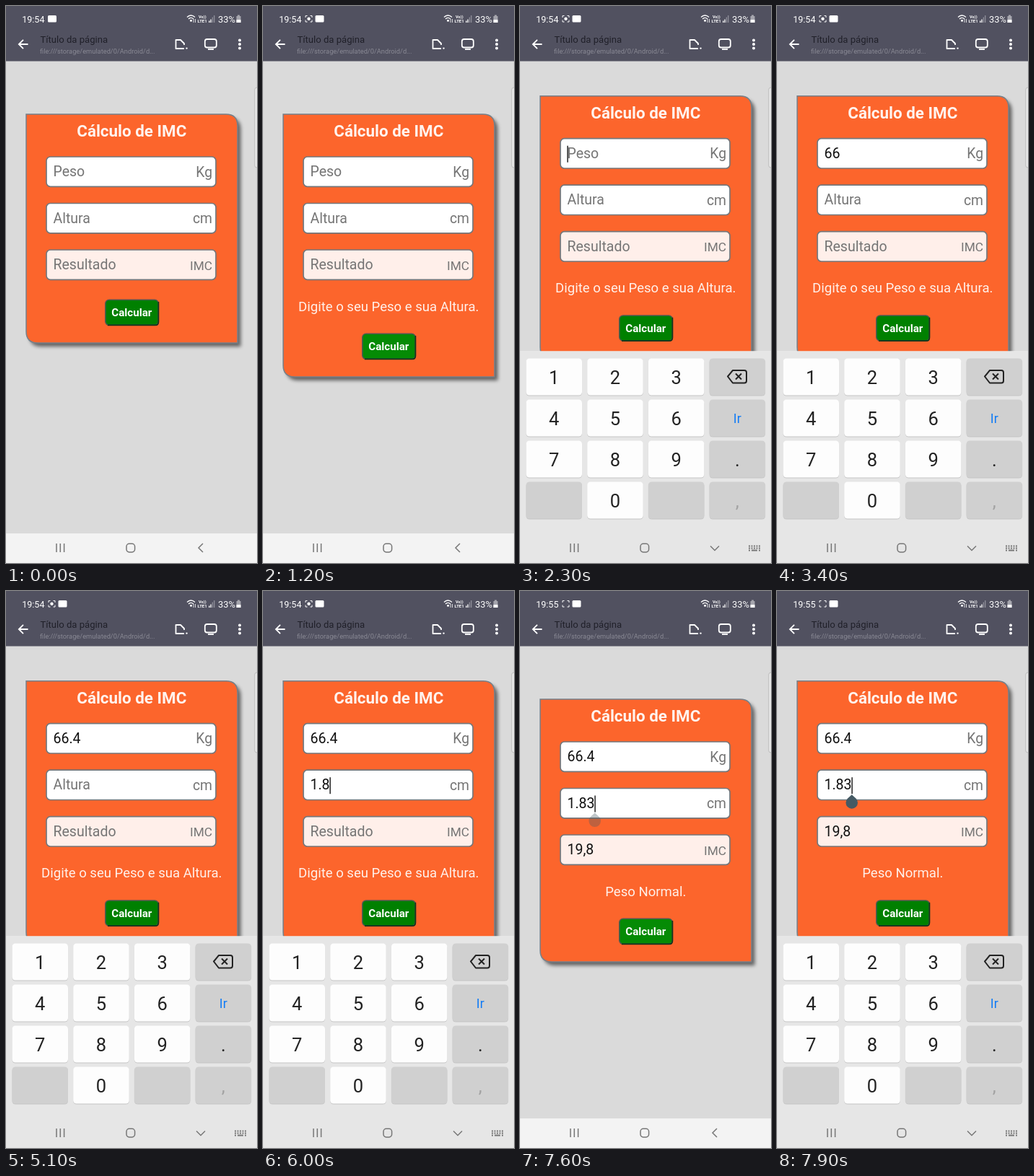
These frames come from a looping animation (348x772 px, 8000 ms). An HTML page:

```html
<!DOCTYPE html>
<html lang="pt">
<head>
<meta charset="utf-8">
<style>
html, body { margin: 0; width: 100%; height: 100%; overflow: hidden; background: #dadada; }
svg { display: block; width: 348px; height: 772px; font-family: Roboto, sans-serif; }
.line { fill: none; stroke: #fff; stroke-width: 1.8; }
.field { stroke: #74777b; stroke-width: 1.7; }
.value { font-size: 19.5px; }
.unit { fill: #757575; text-anchor: end; }
.mid { text-anchor: middle; }
.nav { fill: none; stroke: #777; stroke-width: 1.5; }
.key { font-size: 25.5px; fill: #222; text-anchor: middle; }
</style>
</head>
<body>
<svg viewBox="0 0 348 772">
  <defs>
    <filter id="soft" x="-10%" y="-10%" width="125%" height="125%"><feGaussianBlur stdDeviation="2.6"/></filter>
  </defs>
  <rect width="348" height="772" fill="#dadada"/>

  <g id="page">
    <path id="shadow" fill="#000" opacity=".55" filter="url(#soft)" transform="translate(4.5 5)"/>
    <path id="card" fill="#fc652c" stroke="#75808a" stroke-width="1.5"/>
    <text class="mid" x="174.3" y="181" font-size="22.4" font-weight="700" fill="#fff3ee">Cálculo de IMC</text>
    <g id="fields"></g>
    <text id="message" class="mid" x="174.3" y="422.5" font-size="18.56" fill="#fff0ea"></text>
    <g id="button">
      <rect id="face" x="137.8" y="407.3" width="73.5" height="35" rx="5" stroke="#4d5a50" stroke-width="1.6"/>
      <path d="M141 442.4H207Q211.4 442.4 211.4 438V410" fill="none" stroke="#12331a" stroke-width="1.7"/>
      <text class="mid" x="174.3" y="430" font-size="15.1" font-weight="700" fill="#fff">Calcular</text>
    </g>
    <rect id="caret" width="1.5" height="23" fill="#222"/>
    <path id="handle" d="M0 0L6 5.5A8.3 8.3 0 1 1 -6 5.5Z" fill="#455a64"/>
  </g>

  <rect x="344.8" y="113" width="8" height="111" rx="3" fill="#e8e8e8" stroke="#bbb"/>

  <rect width="348" height="76.5" fill="#515160"/>
  <g fill="#fff">
    <text id="clock" x="22.3" y="22.5" font-size="12.5"></text>
    <g id="capture">
      <path d="M59 16V13.5H61.5M65.5 13.5H68V16M68 19.5V22H65.5M61.5 22H59V19.5" class="line" stroke-width="1" style="stroke-width:1"/>
      <circle id="dot" cx="63.5" cy="17.8" r="2.2"/>
    </g>
    <rect id="badge" y="13" width="12" height="9.5" rx="1.5"/>
    <path d="M251 15.5Q256.500 10.500 262 15.500M253 18Q256.500 14.700 260 18" class="line" style="stroke-width:1.3"/>
    <circle cx="256.5" cy="20.3" r="1.5"/>
    <path d="M260 18V23M262.500 23V18" class="line" style="stroke-width:.8"/>
    <text x="267" y="16.500" font-size="5.600" font-weight="700">Vo))</text>
    <text x="265.500" y="23" font-size="6" font-weight="700">LTE1</text>
    <path d="M281.800 23V20.500M284 23V18.500" class="line" style="stroke-width:1.3"/>
    <path d="M286.400 23V15.500M288.700 23V13" class="line" style="stroke-width:1.3;stroke:#92929c"/>
    <text x="294" y="22.500" font-size="12.900">33%</text>
    <path d="M319.500 14H321V12.500H324V14H325.500V23H319.500Z" fill="#a5a5ad"/>
    <path d="M319.500 19H325.500V23H319.500Z"/>
    <path d="M30.500 53H18M24 46.800L17.800 53L24 59.200" class="line"/>
    <path d="M247 59H235.500V47H242L247 52V54" class="line" stroke-linejoin="round"/>
    <circle cx="250.500" cy="58.600" r="1.200"/>
    <rect x="275.800" y="46" width="16" height="11.500" rx="3" class="line"/>
    <path d="M280 60H288" class="line"/>
    <circle cx="324" cy="47.500" r="2"/><circle cx="324" cy="53" r="2"/><circle cx="324" cy="58.500" r="2"/>
  </g>
  <text x="47.500" y="51" font-size="13.100" fill="#202029">Título da página</text>
  <text x="47" y="66" font-size="9.300" fill="#898994">file:///storage/emulated/0/Android/d...</text>

  <rect y="731" width="348" height="41" fill="#f3f3f3"/>
  <rect id="panel" y="478.500" width="348" height="294" fill="#fbfbfb"/>
  <g id="keyboard"><rect y="478.500" width="348" height="294" fill="#e6e6e6"/></g>
  <g class="nav">
    <path d="M70 745V757M75.300 745V757M80.600 745V757"/>
    <rect x="167" y="745.300" width="11.600" height="11.600" rx="3.800"/>
    <path id="back" d="M273 745L267 751L273 757"/>
    <g id="down">
      <path d="M264 748.500L270 754.500L276 748.500"/>
      <path d="M317 748.500H333M317 751.500H333" stroke-dasharray="2 1.500" stroke-width="2"/>
      <path d="M317 754.500H319M321 754.500H329M331 754.500H333" stroke-width="2"/>
    </g>
  </g>
</svg>
<script>
const LOOP = 8000;
const $ = id => document.getElementById(id);
const set = (el, attrs) => { for (const k in attrs) el.setAttribute(k, attrs[k]); };
const show = (el, on) => set(el, { visibility: on ? 'visible' : 'hidden' });
const between = (t, a, b) => t >= a && t < b;
const ramp = (t, start, length) => Math.min(1, Math.max(0, (t - start) / length));
const smooth = p => p * p * (3 - 2 * p);

function add(parent, tag, attrs, text = '') {
  const el = document.createElementNS('http://www.w3.org/2000/svg', tag);
  set(el, attrs);
  el.textContent = text;
  parent.append(el);
  return el;
}

const values = [
  ['Peso', 'Kg', 19.3, '#fff'],
  ['Altura', 'cm', 19.3, '#fff'],
  ['Resultado', 'IMC', 17.3, '#ffefea']
].map(([hint, unit, size, fill], i) => {
  const y = 209 + i * 64.5;
  add($('fields'), 'rect', { x: 56, y, width: 235, height: 41.3, rx: 5.5, fill, class: 'field' });
  add($('fields'), 'text', { x: 286, y: y + 27.5, 'font-size': size, class: 'unit' }, unit);
  return { hint, y, el: add($('fields'), 'text', { x: 65.5, y: y + 27.2, class: 'value' }) };
});

const keys = {};
['1', '2', '3', 'del', '4', '5', '6', 'Ir', '7', '8', '9', '.', '', '0', '', ','].forEach((label, i) => {
  const x = 8.5 + (i % 4) * 84.7, y = 488.5 + Math.floor(i / 4) * 57, cx = x + 38.7;
  const fill = label && i % 4 < 3 ? '#fdfdfd' : '#d0d0d0';
  add($('keyboard'), 'rect', { x, y: y + 1, width: 77.5, height: 51, rx: 4.5, fill: '#c6c6c6' });
  const face = add($('keyboard'), 'rect', { x, y, width: 77.5, height: 51, rx: 4.5, fill });
  if (label === 'del') {
    add($('keyboard'), 'path', {
      d: 'M288 513.500L295 505H311Q314 505 314 508V519.500Q314 522.500 311 522.500H295ZM299 509.500L307 517.500M307 509.500L299 517.500',
      fill: 'none', stroke: '#222', 'stroke-width': 2, 'stroke-linejoin': 'round'
    });
    return;
  }
  keys[label] = { face, fill };
  const tone = { Ir: '#147df5', ',': '#a2a2a2' }[label] || '#222';
  const small = label === 'Ir';
  add($('keyboard'), 'text', {
    x: cx, y: y + (small ? 32.5 : 35.5), class: 'key',
    style: `fill:${tone};${small ? 'font-size:18px' : ''}`
  }, label);
});

// [time, field, text]; each change restarts the caret blink
const edits = [
  [1900, 0, ''], [2700, 0, '6'], [2900, 0, '66'], [3500, 0, '66.'], [3600, 0, '66.4'],
  [5300, 1, ''], [5500, 1, '1'], [5700, 1, '1.'], [5900, 1, '1.8'], [6200, 1, '1.83'],
  [7500, 1, '1.83']
];
const presses = [[2600, '6'], [2800, '6'], [3500, '4'], [5400, '1'], [5800, '8'], [6100, '3']];
const WARNED = 1100, SOLVED = 6600, OPEN = [1950, 7650], CLOSE = 6700;

function drawFields(t) {
  const content = ['', '', t >= SOLVED ? '19,8' : ''];
  let last = null;
  for (const edit of edits) if (t >= edit[0]) { content[edit[1]] = edit[2]; last = edit; }
  values.forEach(({ hint, el }, i) => {
    el.textContent = content[i] || hint;
    set(el, { fill: content[i] ? '#111' : '#757575' });
  });
  const focused = last && !between(t, 6500, 7500);
  show($('caret'), focused && (t - last[0]) % 1000 < 500);
  if (!focused) return;
  const { el, y } = values[last[1]];
  const width = last[2] ? el.getComputedTextLength() : 0;
  set($('caret'), { x: 65.3 + width, y: y + 10 });
}

function drawPage(t, opened) {
  const scroll = smooth(ramp(t, OPEN[0] + 150, 90)) - smooth(ramp(t, CLOSE, 150)) + smooth(ramp(t, OPEN[1] + 150, 90));
  set($('page'), { transform: `translate(0 ${-25.3 * scroll})` });
  const warned = t >= WARNED, bottom = warned ? 514 : 467;
  const outline = `M28 150H305Q321 150 321 166V${bottom}H44Q28 ${bottom} 28 ${bottom - 16}Z`;
  set($('card'), { d: outline });
  set($('shadow'), { d: outline });
  $('message').textContent = t >= SOLVED ? 'Peso Normal.' : warned ? 'Digite o seu Peso e sua Altura.' : '';
  set($('button'), { transform: `translate(0 ${warned ? 47 : 0})` });
  const lit = between(t, 1000, 2150) || between(t, 6500, 7800);
  set($('face'), { fill: lit ? '#058b05' : '#008000' });
  set($('handle'), { transform: 'translate(103.7 307.500)', opacity: ramp(t, 7550, 150) });
}

function drawKeyboard(t) {
  const p = ramp(t, OPEN[0], 200) - ramp(t, CLOSE, 200) + ramp(t, OPEN[1], 200);
  show($('panel'), p > 0);
  set($('keyboard'), { transform: `translate(0 ${294 * (1 - p)})`, opacity: p });
  show($('down'), p > .5);
  show($('back'), p <= .5);
  for (const label in keys) {
    const down = presses.some(([at, key]) => key === label && between(t, at, at + 100));
    set(keys[label].face, { fill: down ? '#dcdcdc' : keys[label].fill });
  }
}

function drawStatus(t) {
  const late = t >= 6800, capturing = t >= 300;
  $('clock').textContent = late ? '19:55' : '19:54';
  show($('capture'), capturing);
  show($('dot'), capturing && !late);
  set($('badge'), { x: capturing ? 72.500 : 58 });
}

const start = performance.now();
function frame() {
  const t = (performance.now() - start) % LOOP;
  drawPage(t);
  drawFields(t);
  drawKeyboard(t);
  drawStatus(t);
  requestAnimationFrame(frame);
}
frame();
</script>
</body>
</html>
```
